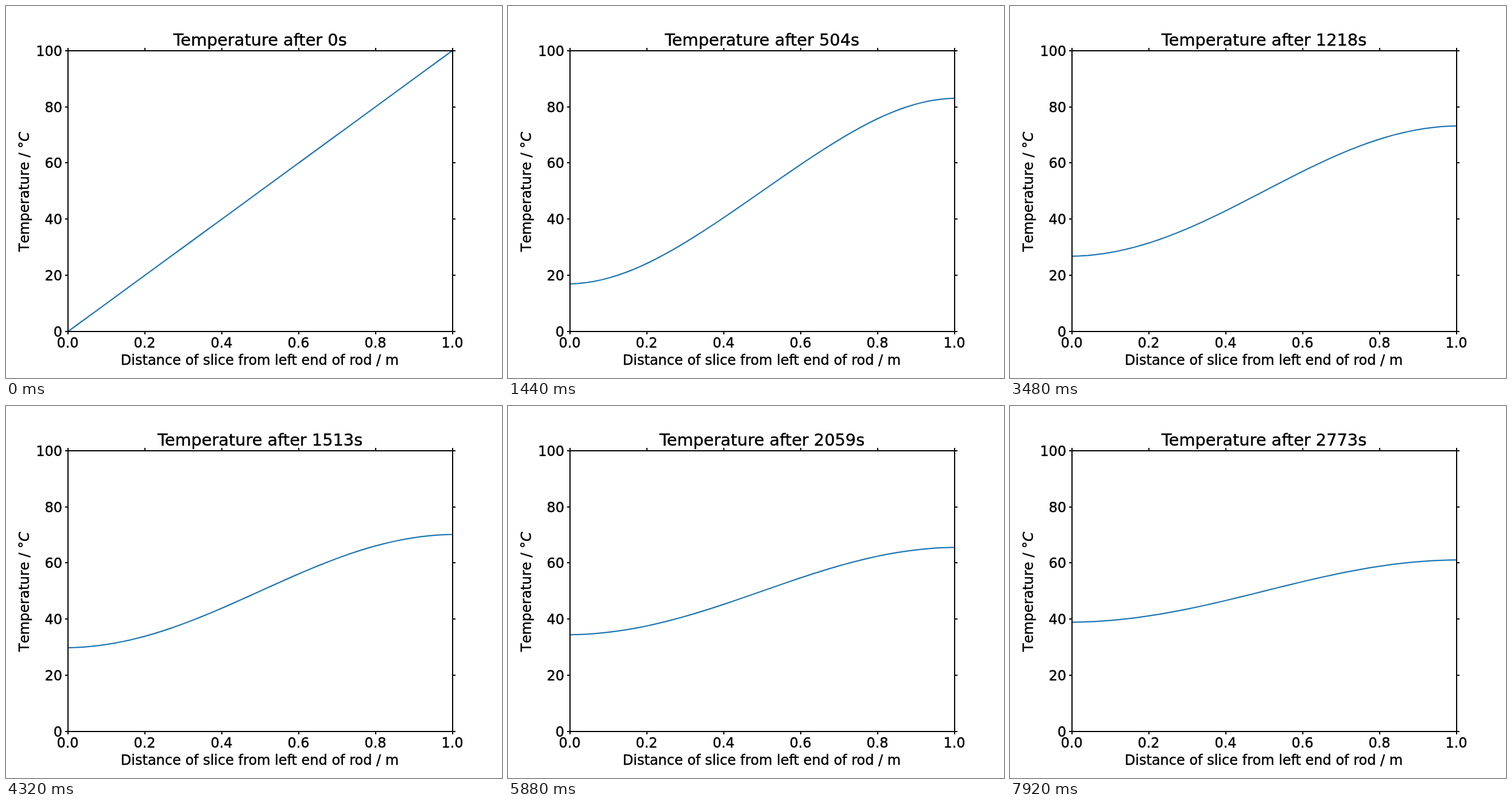
Animation, 864 px wide and 648 px high, one loop 8000 ms. Source, as an HTML page:

```html
<!DOCTYPE html>
<html lang="en">
<head>
<meta charset="utf-8">
<title>Rod temperature</title>
<style>
  html, body { margin: 0; width: 100%; height: 100%; overflow: hidden; background: #fff; }
  svg { display: block; width: 864px; height: 648px; }
  text { font: 24px "DejaVu Sans", sans-serif; fill: #000; stroke: #000; stroke-width: 0.45; text-anchor: middle; }
  #title { font-size: 28.8px; }
  .end { text-anchor: end; }
  .start { text-anchor: start; font-kerning: none; }
  .italic { font-style: oblique; }
  #curve { fill: none; stroke: #1f77b4; stroke-width: 2.25; stroke-linejoin: round; }
  #axes { fill: none; stroke: #000; stroke-width: 2; }
</style>
</head>
<body>
<svg viewBox="0 0 864 648">
  <clipPath id="plot"><rect x="108" y="77.76" width="669.6" height="489.24"/></clipPath>
  <path id="curve" clip-path="url(#plot)"/>
  <path id="axes"/>
  <g id="labels"></g>
  <text id="title" x="442.6" y="69"></text>
  <text x="442" y="625">Distance of slice from left end of rod / m</text>
  <text class="start" transform="translate(40 428) rotate(-90)">Temperature / °<tspan class="italic">C</tspan></text>
</svg>
<script>
const LEFT = 108, RIGHT = 777.6, TOP = 77.76, BOTTOM = 567, TICK = 5;
const LOOP = 8000, STEP = 120, SECONDS_PER_STEP = 5000 / 119;
const SLICES = 50, DECAY = 4.75e-4;

const byId = id => document.getElementById(id);
const xAt = f => LEFT + f * (RIGHT - LEFT);
const yAt = temp => BOTTOM - temp / 100 * (BOTTOM - TOP);
const range = n => Array.from({ length: n }, (_, i) => i);
const mode = (n, i) => Math.cos(n * Math.PI * (i + 0.5) / SLICES);

function addLabel(text, x, y, cls = '') {
  const el = document.createElementNS('http://www.w3.org/2000/svg', 'text');
  el.setAttribute('x', x);
  el.setAttribute('y', y);
  el.setAttribute('class', cls);
  el.textContent = text;
  byId('labels').append(el);
}

// Frame and ticks sit on whole pixels.
function drawAxes() {
  const right = Math.round(RIGHT), top = Math.round(TOP);
  let d = `M${LEFT} ${top}H${right}V${BOTTOM}H${LEFT}Z`;
  for (const i of range(6)) {
    const x = Math.round(xAt(i / 5)), y = Math.round(yAt(i * 20));
    d += `M${x} ${BOTTOM}v${TICK}M${x} ${top}v${-TICK}`;
    d += `M${LEFT} ${y}h${-TICK}M${right} ${y}h${TICK}`;
    addLabel((i / 5).toFixed(1), x - 0.5, 595);
    addLabel(i * 20, 98, y + 9, 'end');
  }
  byId('axes').setAttribute('d', d);
}

// Cosine modes of a linear profile in a rod with insulated ends.
const slices = range(SLICES);
const weights = slices.map(n => n === 0 ? 50 :
  2 / SLICES * slices.reduce((sum, i) => sum + 100 * i / (SLICES - 1) * mode(n, i), 0));
const rates = slices.map(n =>
  DECAY * (2 * SLICES / Math.PI * Math.sin(n * Math.PI / 2 / SLICES)) ** 2);

function drawCurve(seconds) {
  const amps = weights.map((w, n) => w * Math.exp(-rates[n] * seconds));
  const points = slices.map(i => {
    const temp = amps.reduce((sum, a, n) => sum + a * mode(n, i), 0);
    return `${xAt(i / (SLICES - 1)).toFixed(2)} ${yAt(temp).toFixed(2)}`;
  });
  byId('curve').setAttribute('d', 'M' + points.join('L'));
}

let shown = -1;
function update() {
  const step = Math.floor(performance.now() % LOOP / STEP);
  if (step !== shown) {
    shown = step;
    const seconds = step * SECONDS_PER_STEP;
    byId('title').textContent = `Temperature after ${Math.round(seconds)}s`;
    drawCurve(seconds);
  }
  requestAnimationFrame(update);
}

drawAxes();
update();
</script>
</body>
</html>
```
